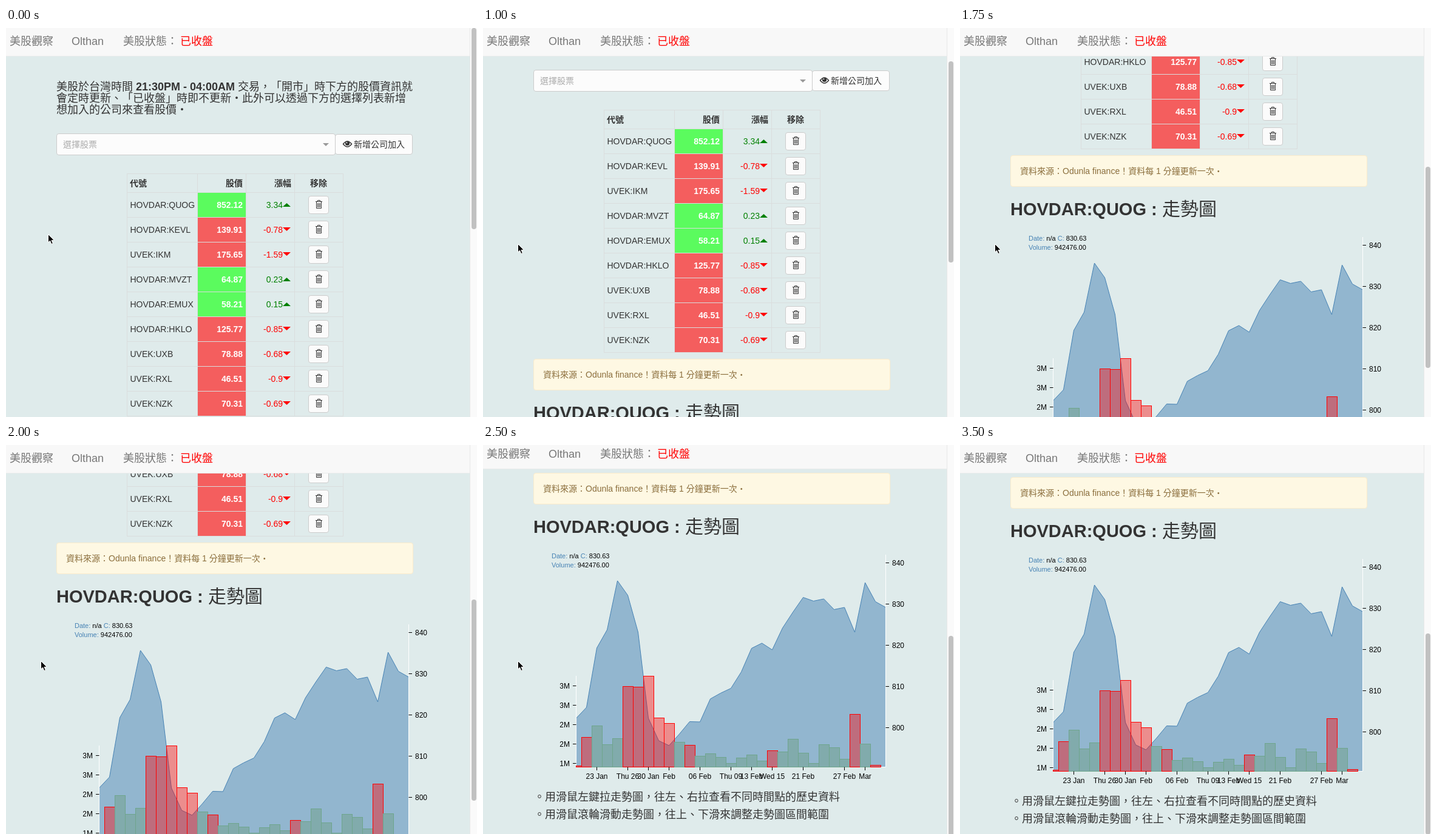
These frames come from a looping animation (776 by 642 pixels, 4750 ms). An HTML page:

```html
<!DOCTYPE html>
<html lang="zh-Hant">
<head>
<meta charset="utf-8">
<title>美股觀察</title>
<style>
html, body { margin: 0; width: 100%; height: 100%; overflow: hidden; background: #dfebeb; }
svg { display: block; }
text {
  font-family: "Liberation Sans", "Noto Sans CJK TC", "Noto Sans CJK", sans-serif;
  font-size: 14px;
  fill: #333;
  text-spacing-trim: space-all;
}
.big { font-size: 18px; }
.nav { font-size: 18px; fill: #777; }
.bold { font-weight: bold; }
.end { text-anchor: end; }
.mid { text-anchor: middle; }
.axis { font-size: 12px; fill: #000; }
.legend { font-size: 11px; fill: #000; }
.legend tspan { fill: #4682b4; }
</style>
</head>
<body>
<svg id="stage" width="776" height="642" viewBox="0 0 776 642"></svg>
<script>
const MAX_SCROLL = 598;
const LOOP = 4750;

const rect = (x, y, w, h, fill, extra = '') =>
  `<rect x="${x}" y="${y}" width="${w}" height="${h}" fill="${fill}" ${extra}/>`;
const box = (x, y, w, h, fill, stroke) =>
  rect(x + .5, y + .5, w - 1, h - 1, fill, `stroke="${stroke}" rx="3.5"`);
const path = (d, fill, extra = '') => `<path d="${d}" fill="${fill}" ${extra}/>`;
const line = (d, stroke) => path(d, 'none', `stroke="${stroke}"`);
const text = (x, y, str, cls = '', extra = '') =>
  `<text x="${x}" y="${y}" class="${cls}" ${extra}>${str}</text>`;

function intro() {
  return text(83, 103, '美股於台灣時間 <tspan class="bold">21:30PM - 04:00AM</tspan> 交易，「開市」時下方的股價資訊就', 'big') +
    text(83, 122, '會定時更新、「已收盤」時即不更新・此外可以透過下方的選擇列表新增', 'big') +
    text(83, 141, '想加入的公司來查看股價・', 'big');
}

function picker() {
  return box(83, 174, 460, 36, '#fcfcfc', '#ccc') +
    text(94, 197, '選擇股票', '', 'style="fill:#aaa;font-weight:500"') +
    path('M522 190h10l-5 5z', '#999') +
    box(542, 175, 128, 34, '#fcfcfc', '#ccc') +
    path('M555.5 191.5Q562.5 182.500 569.500 191.500Q562.500 200.500 555.500 191.500z', '#fcfcfc', 'stroke="#333" stroke-width="1.4"') +
    '<circle cx="562.5" cy="190.5" r="3.6" fill="#333"/>' +
    '<circle cx="561.3" cy="189.3" r="1" fill="#fcfcfc"/>' +
    text(573, 197, '新增公司加入');
}

const stocks = [
  ['HOVDAR:QUOG', '852.12', '3.34'],
  ['HOVDAR:KEVL', '139.91', '-0.78'],
  ['UVEK:IKM', '175.65', '-1.59'],
  ['HOVDAR:MVZT', '64.87', '0.23'],
  ['HOVDAR:EMUX', '58.21', '0.15'],
  ['HOVDAR:HKLO', '125.77', '-0.85'],
  ['UVEK:UXB', '78.88', '-0.68'],
  ['UVEK:RXL', '46.51', '-0.9'],
  ['UVEK:NZK', '70.31', '-0.69']
];

function trash(y) {
  return box(498, y - 15, 34, 30, '#fbfbfb', '#ccc') +
    line(`M510 ${y - 5.5}h11M513.5 ${y - 6}v-1.500h4v1.500M511.500 ${y - 5}v10.500h8v-10.500M513.500 ${y - 3}v7M515.500 ${y - 3}v7M517.500 ${y - 3}v7`, '#333');
}

function stockRow([name, price, change], i) {
  const y = 292 + 41 * i;
  const up = change[0] !== '-';
  const tone = up ? '#008000' : '#f00';
  const caret = up ? `M456 ${y + 3}l6.500 -6l6.500 6z` : `M456 ${y - 4}h13l-6.500 6z`;
  return rect(316, y - 20, 79, 40, up ? '#5bfb5e' : '#f45e5e') +
    text(204.5, y + 5, name) +
    text(390, y + 5, price, 'bold end', 'style="fill:#fff"') +
    text(456, y + 5, change, 'end', `style="fill:${tone}"`) +
    path(caret, tone) + trash(y);
}

function table() {
  let grid = 'M199 240.5h357';
  for (let i = 0; i <= 9; i++) grid += `M199 ${271.5 + 41 * i}h357`;
  for (const x of [199, 315, 395, 475, 555]) grid += `M${x + .5} 240v401`;
  return line(grid, '#dadddd') +
    text(204, 261, '代號', 'bold') + text(390, 261, '股價', 'bold end') +
    text(470, 261, '漲幅', 'bold end') + text(515, 261, '移除', 'bold mid') +
    stocks.map(stockRow).join('');
}

function notice() {
  return box(83, 651, 588, 52, '#fef8e3', '#faebcc') +
    text(99, 682, '資料來源：Odunla finance！資料每 1 分鐘更新一次・', '', 'style="fill:#8a6d3b"') +
    text(83, 750, stocks[0][0], 'bold', 'style="font-size:29px"') +
    text(315, 750, ':', 'bold', 'style="font-size:29px"') +
    text(333, 750, '走勢圖', '', 'style="font-size:30px"');
}

// One point per trading day; heights are measured inside the chart group.
const STEP = 17, LEFT = 153.5, RIGHT = 663.5, BASE = 538.5;
const dayX = k => LEFT + STEP * k;
const closes = [458, 440, 342, 312, 231, 255, 316, 458, 495, 503, 484, 463.5, 464, 426, 416.5, 408.5,
  381.5, 342.5, 334, 345, 309, 283, 258.5, 264.5, 261, 278.5, 275, 316, 234, 265.5, 275];
const volumes = [536, 489, 470, 501, 491, 405, 406, 388, 457, 466, 497, 502, 520, 516, 522, 532,
  523, 518, 528, 511, 513, 492, 515, 532, 501, 506, 525, 451, 500, 535];
const fallDays = [0, 1, 5, 6, 7, 8, 9, 11, 19, 27, 29];
const days = { 2: '23 Jan', 5: 'Thu 26', 7: '30 Jan', 9: 'Feb', 12: '06 Feb', 15: 'Thu 09',
  17: '13 Feb', 19: 'Wed 15', 22: '21 Feb', 26: '27 Feb', 28: 'Mar' };

function volumeBar(top, k) {
  const fall = fallDays.includes(k);
  const x = k ? dayX(k) - 8 : LEFT;
  return rect(x, top + .5, dayX(k) + 9 - x, BASE - top - .5,
    fall ? 'rgba(255,0,0,.4)' : 'rgba(115,162,138,.5)',
    `stroke="${fall ? '#f00' : '#6ea58c'}"`);
}

function chart() {
  const curve = 'M' + closes.map((y, k) => `${dayX(k)} ${y}`).join('L');
  let out = path(`${curve}V${BASE}H${LEFT}z`, 'rgba(70,130,180,.5)') +
    line(curve, '#4682b4') +
    line(`M${RIGHT} 188V${BASE}M${LEFT} 388V${BASE}H${RIGHT}`, '#fff') +
    volumes.map(volumeBar).join('');
  for (let i = 0; i < 5; i++) {
    const y = 201.5 + 68 * i, v = 404.5 + 32 * i;
    out += line(`M${RIGHT} ${y}h5.500M${LEFT} ${v}h-5.500`, '#000') +
      text(674, y + 4.5, 840 - 10 * i, 'axis') +
      text(143, v + 4, ['3M', '3M', '2M', '2M', '1M'][i], 'axis end');
  }
  for (const k in days)
    out += line(`M${dayX(+k)} ${BASE}v5.500`, '#000') + text(dayX(+k), 557.5, days[k], 'axis mid');
  return `<g transform="translate(0 ${MAX_SCROLL})">` + out +
    text(113, 194, '<tspan>Date:</tspan> n/a <tspan>C:</tspan> 830.63', 'legend') +
    text(113, 209, '<tspan>Volume:</tspan> 942476.00', 'legend') +
    text(84, 594, '。用滑鼠左鍵拉走勢圖，往左、右拉查看不同時間點的歷史資料', 'big') +
    text(84, 623, '。用滑鼠滾輪滑動走勢圖，往上、下滑來調整走勢圖區間範圍', 'big') + '</g>';
}

function navbar() {
  return rect(0, -10, 764, 57, '#f8f8f8') + rect(0, 46, 764, 1, '#e9ebeb') +
    text(6, 28, '美股觀察', 'nav') + text(108, 28, 'Olthan', 'nav') +
    text(193, 28, '美股狀態：', 'nav') + text(287, 28, '已收盤', 'nav', 'style="fill:#f00"');
}

const stage = document.getElementById('stage');
stage.innerHTML = rect(0, 0, 776, 642, '#dfebeb') +
  `<g id="page">${intro() + picker() + table() + notice() + chart()}</g>` +
  `<g id="nav">${navbar()}</g>` +
  rect(764, 0, 12, 642, '#fafafa') + rect(764, 0, 1, 642, '#e8e8e8') +
  rect(767, 0, 8, 332, '#c1c1c1', 'id="thumb" rx="4"') +
  path('M.5 .5V14l3.100 -2.900L5.800 16.500l2.500 -1L6 10.400h4.300z', '#000', 'id="cursor" stroke="#fff"');

const [page, nav, thumb, cursor] = ['page', 'nav', 'thumb', 'cursor'].map(id => document.getElementById(id));
const move = (node, x, y) => node.setAttribute('transform', `translate(${x} ${y})`);

// [start in ms, scroll offset]; offsets past the end drag the navbar along
const scrolls = [[0, 0], [1000, 105], [1250, 271], [1750, 441], [2000, 490],
  [2250, 525], [2500, 605], [2750, 599], [3000, 598]];

function draw(now) {
  const t = now % LOOP;
  const scroll = scrolls.filter(s => s[0] <= t).pop()[1];
  move(page, 0, -scroll);
  move(nav, 0, Math.min(0, MAX_SCROLL - scroll));
  thumb.setAttribute('y', Math.round(scroll * .52));
  if (t < 250) move(cursor, 69, 340);
  else move(cursor, 57, 356);
  cursor.setAttribute('visibility', t < 3500 ? 'visible' : 'hidden');
}

const start = performance.now();
function tick() {
  draw(performance.now() - start);
  requestAnimationFrame(tick);
}
tick();
</script>
</body>
</html>
```
